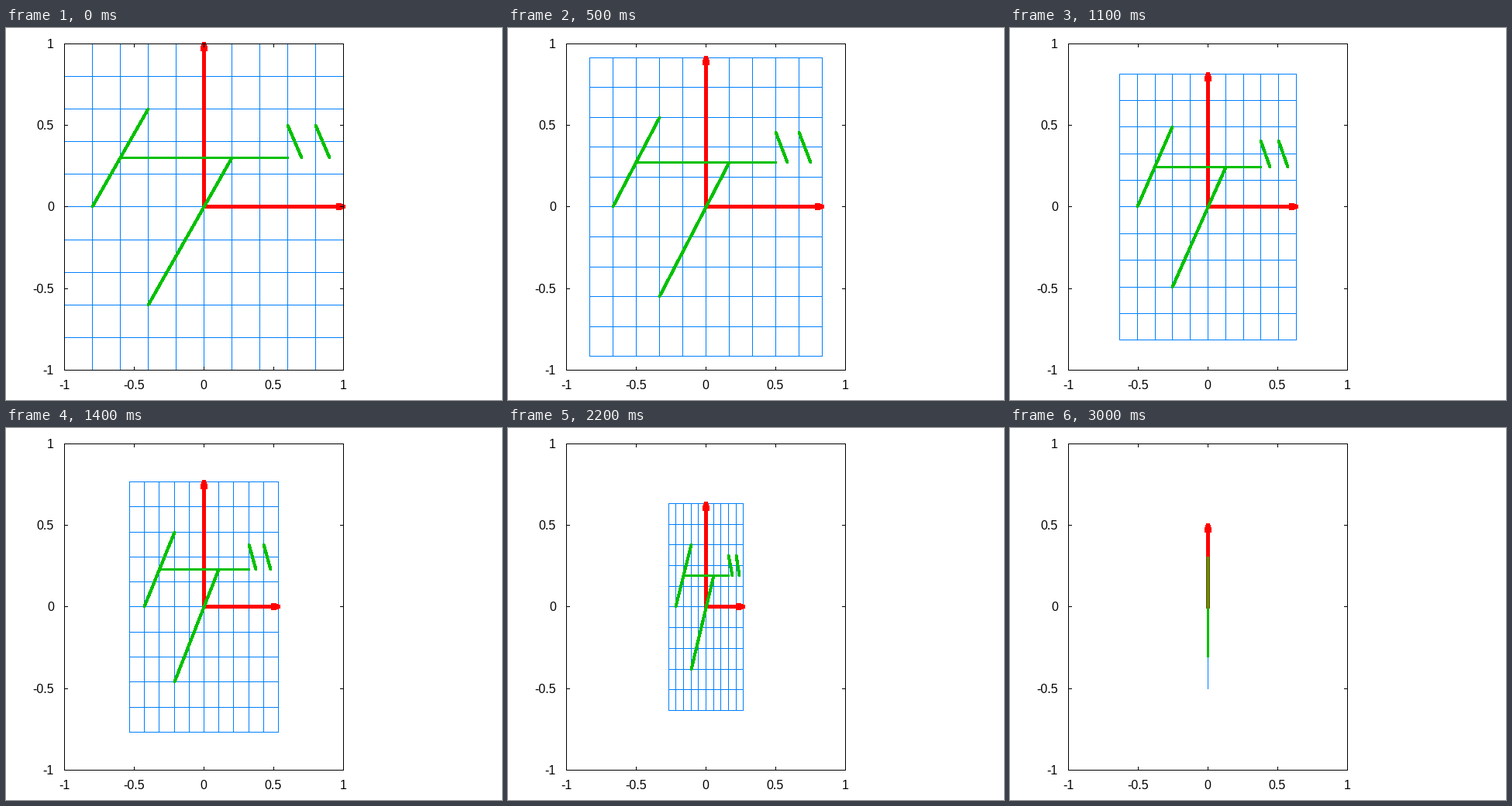
These frames come from a looping animation (640 by 480 pixels, 3100 ms). A matplotlib script:

```python
import math

import matplotlib.pyplot as plt
from matplotlib.animation import FuncAnimation
from matplotlib.collections import LineCollection, PolyCollection

WIDTH, HEIGHT, DPI = 640, 480, 80
PX = 72 / DPI
STEPS, STEP = 30, 0.0333

LEFT, RIGHT, TOP, BOTTOM = 75, 435, 20, 441
BLUE, RED, GREEN = "#0080ff", "#ff0000", "#00c000"
SLOPE, BAR = 1.5, 0.3
SHAFT, HEAD, HEAD_LENGTH, TAPER = 2.5, 4.5, 9.5, 2.8

plt.rcParams["text.hinting"] = "native"


def to_pixel(x, y):
    """Map plot coordinates to the centre of a whole pixel."""
    col = math.floor(LEFT + (RIGHT - LEFT) / 2 * (x + 1) + 0.5 + 1e-9)
    up = math.floor((BOTTOM - TOP) / 2 * (y + 1) + 0.5 + 1e-9)
    return col + 0.5, BOTTOM - up + 0.5


def arrow(x, y):
    """Outline of a thick arrow from the origin to (x, y)."""
    x0, y0 = to_pixel(0, 0)
    x1, y1 = to_pixel(x, y)
    length = math.hypot(x1 - x0, y1 - y0)
    if length == 0:
        return [(x0 + a * SHAFT, y0 + b * SHAFT)
                for a, b in ((-1, -1), (1, -1), (1, 1), (-1, 1))]
    ux, uy = (x1 - x0) / length, (y1 - y0) / length
    # Distance past the tip and half width, from tail to tip
    side = [(-length - SHAFT, SHAFT), (-HEAD_LENGTH, SHAFT), (-HEAD_LENGTH, HEAD),
            (-TAPER, HEAD), (-TAPER, HEAD - 1), (0.5, SHAFT), (SHAFT, SHAFT)]
    outline = side + [(d, -h) for d, h in reversed(side)]
    return [(x1 + d * ux - h * uy, y1 + d * uy + h * ux) for d, h in outline]


def slanted(root, start, end):
    """Segment of the sloping line that crosses zero at root."""
    return [(x, SLOPE * (x - root)) for x in (start, end)]


def add_lines(segments, color, width, cap, zorder):
    lines = LineCollection(segments, colors=color, linewidths=width * PX,
                           capstyle=cap, antialiaseds=False, zorder=zorder)
    lines.set_snap(False)
    ax.add_collection(lines, autolim=False)
    return lines


def border():
    """The box with inward ticks on all four sides."""
    segments = []
    for side in (-1, 1):
        edge_x, edge_y = to_pixel(side, side)
        segments += [[to_pixel(side, -1), to_pixel(side, 1)],
                     [to_pixel(-1, side), to_pixel(1, side)]]
        for v in ticks:
            x, y = to_pixel(v, v)
            segments += [[(x, edge_y), (x, edge_y + 4 * side)],
                         [(edge_x, y), (edge_x - 4 * side, y)]]
    return segments


ticks = [k / 2 for k in range(-2, 3)]
rules = [k / 5 for k in range(-5, 6)]
grid_lines = [[(g, -1), (g, 1)] for g in rules] + [[(-1, g), (1, g)] for g in rules]
shape = [slanted(-0.8, -0.8, -0.4), slanted(0, -0.4, 0.2), [(-0.6, BAR), (0.6, BAR)]]
shape += [[(x, BAR + 0.2), (x + 0.1, BAR)] for x in (0.6, 0.8)]

fig = plt.figure(figsize=(WIDTH / DPI, HEIGHT / DPI), dpi=DPI, facecolor="white")
ax = fig.add_axes([0, 0, 1, 1])
ax.set_xlim(0, WIDTH)
ax.set_ylim(HEIGHT, 0)
ax.axis("off")

grid = add_lines([], BLUE, 1, "projecting", 1)
arrows = PolyCollection([], facecolors=RED, edgecolors="none", antialiaseds=False, zorder=2)
arrows.set_snap(False)
ax.add_collection(arrows, autolim=False)
strokes = add_lines([], GREEN, 3, "round", 3)
add_lines(border(), "black", 1, "projecting", 4)

font = dict(family="Liberation Sans", size=16 * PX, color="black", va="baseline")
for v in ticks:
    x, y = to_pixel(v, v)
    ax.text(x - 0.5, 466, f"{v:g}", ha="center", **font)
    ax.text(62, y + 5.5, f"{v:g}", ha="right", **font)


def update(i):
    sx = 1 - STEP * i
    sy = 1 - STEP * i / 2

    def scaled(lines):
        return [[to_pixel(sx * x, sy * y) for x, y in line] for line in lines]

    grid.set_segments(scaled(grid_lines))
    arrows.set_verts([arrow(sx, 0), arrow(0, sy)])
    strokes.set_segments(scaled(shape))
    return grid, arrows, strokes


anim = FuncAnimation(fig, update, frames=STEPS + 1, interval=100, repeat=True)
plt.show()
```
